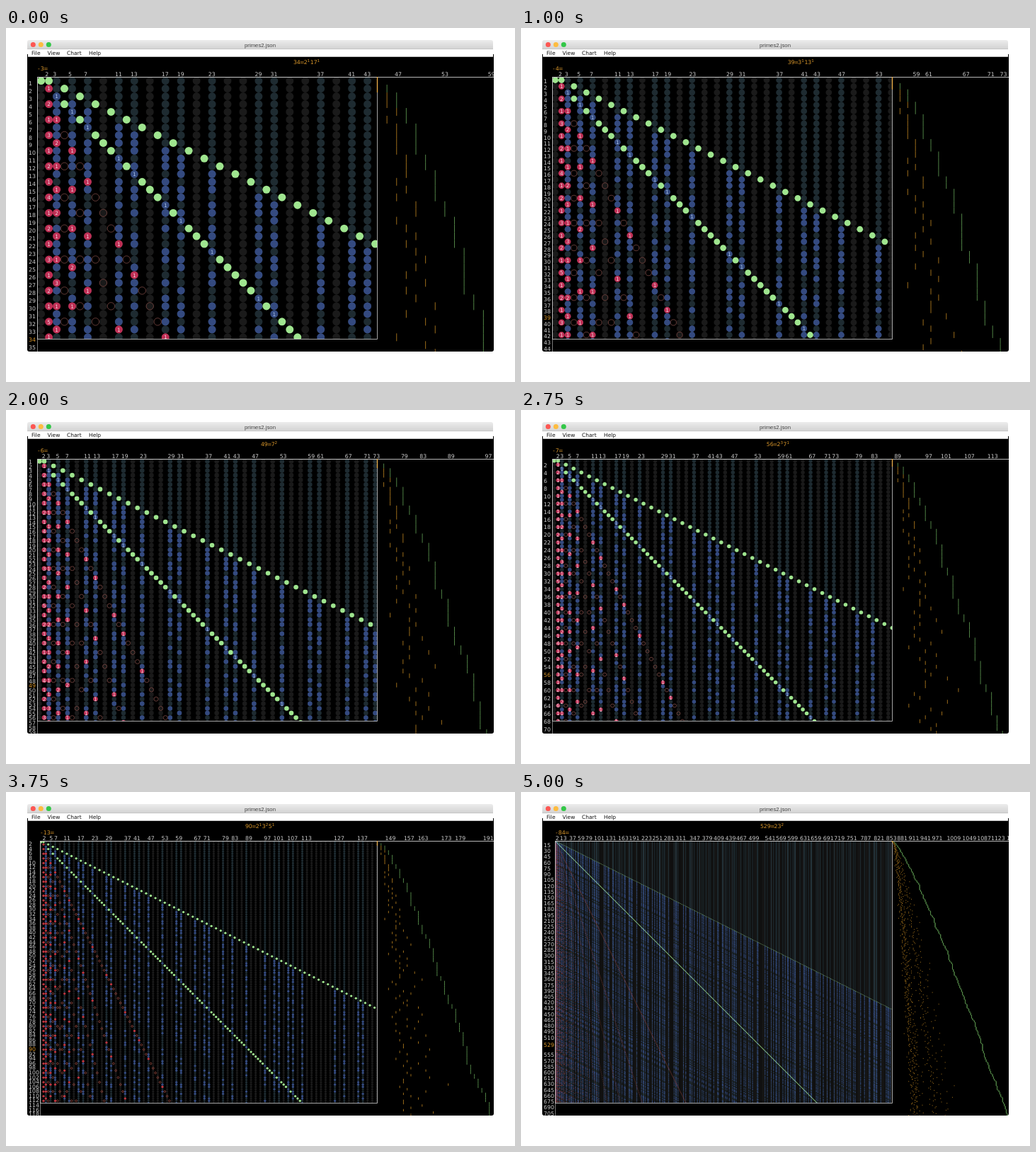
These frames come from a looping animation (719 by 500 pixels, 5250 ms). An HTML page with a canvas:

```html
<!DOCTYPE html>
<html lang="en">
<head>
<meta charset="utf-8">
<title>Prime chart</title>
<style>
html, body { margin: 0; width: 100%; height: 100%; overflow: hidden; background: #fff; }
canvas { display: block; width: 719px; height: 500px; }
</style>
</head>
<body>
<canvas id="stage" width="719" height="500"></canvas>
<script>
const ctx = document.getElementById('stage').getContext('2d');
const STEP_MS = 250, STEPS = 21, UNIT = 0.5488;
const WIN = { left: 30, top: 17, right: 689, bottom: 457, body: 40.7 };
const GRID = { top: 69.5, right: 524.5, bottom: 439.5 };
const NUDGE = 0.4; // cells sit slightly up and left of their grid slots
const COLOR = {
  plain: '#1a1a1a', prime: '#1e2b31', pair: '#344a80', factor: '#bf2f55',
  smallFactor: '#c0353f', ring: '#7c4a44', smallRing: '#9a4a3e',
  multiple: '#9fe58f', smallPrime: '#8fb8e6', label: '#cfcfcf', accent: '#d8962a',
  count: '#5f9a52', pairs: '#b8801f', border: '#cccccc'
};
const SANS = '"DejaVu Sans", sans-serif';

// Pointer path: step, pointer y, readout x, distance left of the grid
const POINTER = [
  [0, 437, 406, 38], [2, 430, 400, 38], [5, 394, 365, 38], [8, 388.5, 360, 40],
  [13, 366, 338, 42], [17, 360.3, 338, 45], [20, 359.5, 338, 46.3]
];

const LIMIT = 2000;
const isPrime = new Array(LIMIT).fill(true, 2);
for (let p = 2; p * p < LIMIT; p++)
  if (isPrime[p]) for (let m = p * p; m < LIMIT; m += p) isPrime[m] = false;
const primes = [];
for (let p = 2; p < LIMIT; p++) if (isPrime[p]) primes.push(p);

const isPair = (p, n) => p > 2 && 2 * n - p > 2 && isPrime[p] && isPrime[2 * n - p];

function pairCount(n) {
  let count = 0;
  for (let p = 3; p <= n; p += 2) if (isPair(p, n)) count++;
  return count;
}
const pairCounts = Array.from({ length: 720 }, (_, n) => pairCount(n));

function exponent(p, n) {
  let e = 0;
  for (; n % p === 0; n /= p) e++;
  return e;
}

function pointerAt(step) {
  let i = 1;
  while (i < POINTER.length - 1 && POINTER[i][0] < step) i++;
  const a = POINTER[i - 1], b = POINTER[i];
  const f = (step - a[0]) / (b[0] - a[0]);
  const [, y, textX, offset] = a.map((v, j) => v + (b[j] - v) * f);
  return { y, textX, offset };
}

function text(str, x, y, color = COLOR.label, size = 7.8, align = 'left', family = SANS) {
  ctx.font = `${size}px ${family}`;
  ctx.textAlign = align;
  ctx.fillStyle = color;
  ctx.fillText(str, x, y);
}

// Evenly pitched characters; returns the end of the run
function spaced(str, x, y) {
  [...str].forEach((ch, i) => text(ch, x + i * 4.9 + 2.45, y, COLOR.accent, 7.8, 'center'));
  return x + str.length * 4.9;
}

function line(x1, y1, x2, y2, color, width = 1) {
  ctx.strokeStyle = color;
  ctx.lineWidth = width;
  ctx.beginPath();
  ctx.moveTo(x1, y1);
  ctx.lineTo(x2, y2);
  ctx.stroke();
}

function disc(x, y, r, color) {
  ctx.fillStyle = color;
  ctx.beginPath();
  ctx.arc(x, y, r, 0, 7);
  ctx.fill();
}

function drawChrome() {
  ctx.fillStyle = '#fff';
  ctx.fillRect(0, 0, 719, 500);
  const bar = ctx.createLinearGradient(0, 17, 0, 30);
  bar.addColorStop(0, '#ececec');
  bar.addColorStop(1, '#d2d2d2');
  ctx.fillStyle = bar;
  ctx.beginPath();
  ctx.roundRect(WIN.left, WIN.top, WIN.right - WIN.left - 1, 13, [3, 3, 0, 0]);
  ctx.fill();
  line(WIN.left, 29.7, WIN.right - 1, 29.7, '#b9b9b9', 0.6);
  ['#fc5753', '#fdbc40', '#33c748'].forEach((c, i) => disc(38.3 + i * 11, 23.5, 3.5, c));
  text('primes2.json', 359, 26.5, '#444', 7.75, 'center', '"Liberation Sans", Arial, sans-serif');
  [['File', 36], ['View', 58.5], ['Chart', 86], ['Help', 117]]
    .forEach(([name, x]) => text(name, x, 38.3, '#111', 7.5));
  ctx.fillStyle = '#000';
  ctx.beginPath();
  ctx.roundRect(WIN.left, WIN.body, WIN.right - WIN.left, WIN.bottom - WIN.body, [0, 0, 3, 3]);
  ctx.fill();
  for (const x of [WIN.left, WIN.right - 1]) ctx.fillRect(x, 37, 1, 4);
}

function drawGrid(left, d) {
  const rows = Math.ceil((GRID.bottom - GRID.top) / d);
  const cols = Math.ceil((GRID.right - left) / d);
  const showDigits = d > 5.4, tiny = d < 1.5;
  const factorColor = showDigits ? COLOR.factor : COLOR.smallFactor;
  const ringColor = showDigits ? COLOR.ring : COLOR.smallRing;
  const cx = c => left - NUDGE + (c - 0.5) * d;
  const cy = n => GRID.top - NUDGE + (n - 0.5) * d;
  const dot = (c, n, color, min = 1) => {
    if (c > cols) return;
    if (!tiny) return disc(cx(c), cy(n), d / 2, color);
    const s = Math.max(d, min);
    ctx.fillStyle = color;
    ctx.fillRect(cx(c) - s / 2, cy(n) - s / 2, s, s);
  };
  const digit = (value, c, n, color) =>
    text(value, cx(c), cy(n) + 2.7, color, 7.3, 'center');

  ctx.save();
  ctx.beginPath();
  ctx.rect(left, GRID.top, GRID.right - left, GRID.bottom - GRID.top);
  ctx.clip();

  // Odd columns only: a round-capped dash per cell, or solid stripes when tiny
  if (!tiny) {
    ctx.lineCap = 'round';
    ctx.setLineDash([0.01, d - 0.01]);
  }
  for (let c = 1; c <= cols; c += 2) {
    const color = !isPrime[c] ? COLOR.plain : tiny ? '#2b3d45' : COLOR.prime;
    line(cx(c), cy(1), cx(c), GRID.bottom + d, color, Math.max(d, 0.9));
  }
  ctx.setLineDash([]);
  ctx.lineCap = 'butt';

  for (const p of primes) {
    if (p > cols) break;
    for (let n = Math.ceil(p / 2); n <= rows; n++) if (isPair(p, n)) dot(p, n, COLOR.pair);
  }

  for (let n = 1; n <= rows; n++) {
    for (let c = 2; c <= n / 2 || c === 2 && n === 2; c++) {
      if (n % c) continue;
      ctx.globalAlpha = tiny ? 0.55 : 1;
      if (isPrime[c]) {
        dot(c, n, factorColor);
        if (showDigits) digit(exponent(c, n), c, n, '#f3d3dc');
      } else if (tiny) {
        dot(c, n, ringColor);
      } else {
        ctx.strokeStyle = ringColor;
        ctx.lineWidth = 0.8;
        ctx.beginPath();
        ctx.arc(cx(c), cy(n), Math.max(d / 2 - 0.3, 1.3), 0, 7);
        ctx.stroke();
      }
      ctx.globalAlpha = 1;
    }
    if (!isPrime[n]) {
      if (tiny || d > 3) dot(n, n, COLOR.multiple, 0.85);
      else disc(cx(n), cy(n), 1.5, COLOR.multiple);
    } else if (n > 2) {
      if (showDigits) digit(1, n, n, '#a9c4ea');
      else if (d < 3) dot(n, n, COLOR.smallPrime, 0.85);
    }
    dot(2 * n, n, COLOR.multiple, 0.6);
  }
  ctx.restore();

  line(left, GRID.top, WIN.right, GRID.top, COLOR.border, 0.9);
  line(left, GRID.top, left, WIN.bottom, '#999', 0.8);
  ctx.strokeStyle = COLOR.border;
  ctx.strokeRect(left, GRID.top, GRID.right - left, GRID.bottom - GRID.top);
}

function drawCounts(d, rows) {
  const total = primes.filter(p => p <= rows).length;
  const pitch = (688 - GRID.right) / (total + 1);
  const mark = (value, n, color, width) => {
    const x = GRID.right + value * pitch, y = GRID.top - NUDGE + (n - 1) * d;
    line(x, y, x, y + Math.max(d, 1.1), color, width);
  };
  let count = 0;
  for (let n = 1; n <= rows; n++) {
    if (isPrime[n]) count++;
    mark(count, n, COLOR.count, 0.85);
    const zero = pairCounts[n] === 0;
    mark(pairCounts[n], n, zero ? '#eeb04a' : COLOR.pairs, zero ? 1.3 : 0.85);
  }
}

function drawLabels(left, d, k, rows, current) {
  let last = -99, need = 0;
  for (const p of primes) {
    const x = left + (p - 1) * d - 0.3;
    if (x > WIN.right) break;
    if ((p - last) * k <= need) continue;
    text(p, x, 67.6);
    last = p;
    need = Math.min(9 * String(p).length, 35);
  }
  const every = k === 1 ? 15 : Math.ceil(12 / k);
  for (let n = every; n <= rows; n += every)
    if (Math.abs(n - current) * d > 6.5) text(n, 32, GRID.top + n * d + 0.2);
  text(current, 32, GRID.top + current * d + 0.2, COLOR.accent);
}

function drawReadout(n, x) {
  x = spaced(n + '=', x, 51.3);
  for (const p of primes) {
    if (p > n) break;
    const e = exponent(p, n);
    if (!e) continue;
    x = spaced(String(p), x, 51.3);
    text(e, x, 47.8, COLOR.accent, 5.6);
    x += 4.2;
  }
}

function draw(step) {
  const k = step < 10 ? 20 - step : 21 - step;
  const d = k * UNIT;
  const left = k > 7 ? 44.5 : 48.5;
  const rows = Math.ceil((WIN.bottom - GRID.top) / d);
  const pointer = pointerAt(step);
  const current = Math.floor((pointer.y - GRID.top) / d) + 1;

  drawChrome();
  ctx.save();
  ctx.beginPath();
  ctx.rect(WIN.left, WIN.body, WIN.right - WIN.left, WIN.bottom - WIN.body);
  ctx.clip();
  drawGrid(left, d);
  drawCounts(d, rows);
  drawLabels(left, d, k, rows, current);
  spaced(`-${Math.floor(pointer.offset / d)}=`, left - 0.5, 60.2);
  drawReadout(current, pointer.textX);
  ctx.restore();
}

let shown = -1;
const start = performance.now();
function tick() {
  const step = Math.floor(Math.max(0, performance.now() - start) / STEP_MS) % STEPS;
  if (step !== shown) draw(shown = step);
  requestAnimationFrame(tick);
}
tick();
</script>
</body>
</html>
```
